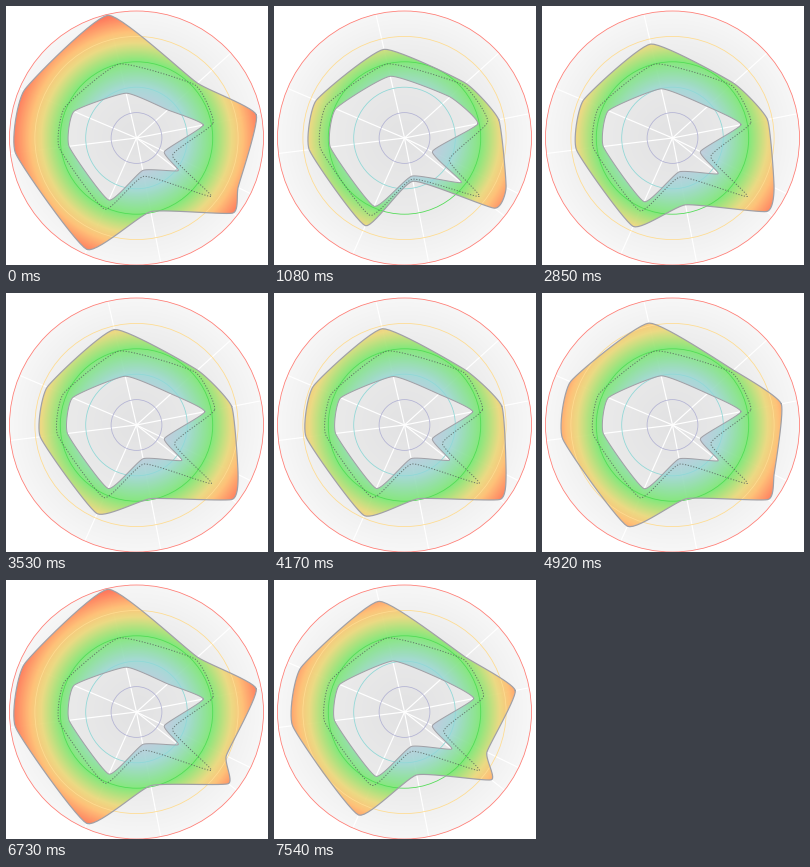
A matplotlib script for the animation above (7.57 s loop, 262 by 259 pixels).

```python
import numpy as np
import matplotlib.pyplot as plt
from matplotlib.animation import FuncAnimation
from matplotlib.colors import to_rgb
from matplotlib.path import Path

W, H, DPI = 262, 259, 64
PX = 72 / DPI                      # points per pixel
CX, CY, R = 130.5, 132, 127
LOOP, STEP = 7570, 10
TICK, PAUSE = 60, 100              # ms between redraws, rest between moves

SPOKES = [11, 42, 103, 157, 187, 246, 281, 322, 334]
ANGLES = np.radians(SPOKES)
DIRS = np.column_stack([np.cos(ANGLES), -np.sin(ANGLES)])


def profile(reach, special):
    """Radius per spoke: a common reach with a few exceptions."""
    return [special.get(a, reach) for a in SPOKES]


def pose(reach, top, notch, tip, heel=113, grow=0.25):
    """Outer, inner and median radii; grow runs from 0 (tight) to 1 (wide)."""
    outer = profile(reach, {42: 82, 103: top, 281: notch, 322: tip, 334: heel})
    inner = profile(68 + 7 * grow, {42: 42 + 20 * grow, 103: 46 + 18 * grow,
                                    281: 33 + 6 * grow, 322: 53 + 20 * grow,
                                    334: 31})
    median = profile(78 + 7 * grow, {103: 76, 42: 79, 281: 39 + 3 * grow,
                                     322: 95, 334: 40 + 10 * grow})
    return np.array([outer, inner, median], float)


WIDE = dict(reach=122, top=126, notch=75, tip=122)
SLIM = dict(reach=96, top=91, notch=44, tip=114)
FULL = dict(reach=97, top=98, notch=75, tip=121)
GROWN = dict(reach=110, top=103, notch=75, tip=121)

POSES = [
    pose(**WIDE, grow=0),
    pose(**SLIM, grow=0.95),
    pose(**SLIM, grow=1),
    pose(**SLIM),
    pose(**FULL),
    pose(**FULL, grow=0.2),
    pose(**GROWN),
    pose(**WIDE),
    pose(**WIDE, grow=0),
    pose(122, 126, 75, tip=108, heel=80, grow=0),
    pose(**SLIM, grow=1),
]
STARTS = [100, 860, 1620, 2390, 3190, 4030, 4810, 5620, 6460, 7250, 8090]


def radii(ms):
    i = np.searchsorted(STARTS, ms, side="right") - 1
    if i < 0:
        return POSES[0]
    span = STARTS[i + 1] - STARTS[i] - PAUSE
    ticks = (ms - STARTS[i]) // TICK + 1
    p = (1 - np.cos(np.pi * min(ticks * TICK / span, 1))) / 2
    return POSES[i] + (POSES[i + 1] - POSES[i]) * p


def smooth(r, k=0.075, n=14):
    """Closed cardinal spline through the spoke points."""
    p = DIRS * r[:, None] + (CX, CY)
    q = np.roll(p, -1, axis=0)
    hp = (q - np.roll(p, 1, axis=0)) * k
    hq = np.roll(hp, -1, axis=0)
    t = np.linspace(0, 1, n, endpoint=False)[None, :, None]
    a, b, c, d = (v[:, None] for v in (p, p + hp, q - hq, q))
    s = 1 - t
    curve = s**3 * a + 3 * s * s * t * b + 3 * s * t * t * c + t**3 * d
    curve = curve.reshape(-1, 2)
    return np.vstack([curve, curve[:1]])


def radial(dist, stops):
    colors = np.array([to_rgb(c) for c in stops.values()])
    return np.dstack([np.interp(dist, list(stops), ch) for ch in colors.T])


yy, xx = np.mgrid[0:H, 0:W] + 0.5
dist = np.hypot(xx - CX, yy - CY)

base = radial(dist, {0: "#e2e2e3", 77: "#ebebeb", 127: "#f7f7f7"})
disc = np.clip(R - dist + 0.5, 0, 1)[..., None]
base = base * disc + 1 - disc

rainbow = radial(dist, {25: "#c8c8de", 51: "#a2d8d6", 77: "#7fe874",
                        95: "#ebd97c", 106: "#ffbf70", 124: "#ff7052"})
rainbow = np.dstack([rainbow, np.full(dist.shape, 0.93)])

fig = plt.figure(figsize=(W / DPI, H / DPI), dpi=DPI, facecolor="white")
ax = fig.add_axes([0, 0, 1, 1])
box = dict(extent=(0, W, H, 0), interpolation="nearest", aspect="auto")
ax.imshow(base, zorder=0, **box)
band = ax.imshow(rainbow, zorder=2, **box)
ax.set_xlim(0, W)
ax.set_ylim(H, 0)
ax.axis("off")

for dx, dy in DIRS:
    ax.plot([CX, CX + R * dx], [CY, CY + R * dy], color="white",
            lw=1.2 * PX, zorder=1)

RING_COLORS = ["#b4b4d4", "#90d8d6", "#50dc54", "#ffdc90", "#ff7c74"]
for i, color in enumerate(RING_COLORS, 1):
    ax.add_patch(plt.Circle((CX, CY), R * i / 5, fill=False, ec=color,
                            lw=0.8 * PX, zorder=3))

outer_line, = ax.plot([], [], color="#a0a0a6", lw=1.2 * PX, zorder=4)
inner_line, = ax.plot([], [], color="#a0a0a6", lw=PX, zorder=4)
dots, = ax.plot([], [], color="#56605c", alpha=0.8, lw=PX, zorder=5,
                ls=(0, (1.2, 1.6)), dash_capstyle="butt")


def draw(i):
    outer, inner, median = (smooth(r) for r in radii(i * STEP))
    outer_line.set_data(*outer.T)
    inner_line.set_data(*inner.T)
    dots.set_data(*median.T)
    ring = Path.make_compound_path(Path(outer, closed=True),
                                   Path(inner[::-1], closed=True))
    band.set_clip_path(ring, ax.transData)
    return band, outer_line, inner_line, dots


anim = FuncAnimation(fig, draw, frames=LOOP // STEP, interval=STEP,
                     repeat=True, repeat_delay=0, blit=False)
plt.show()
```
